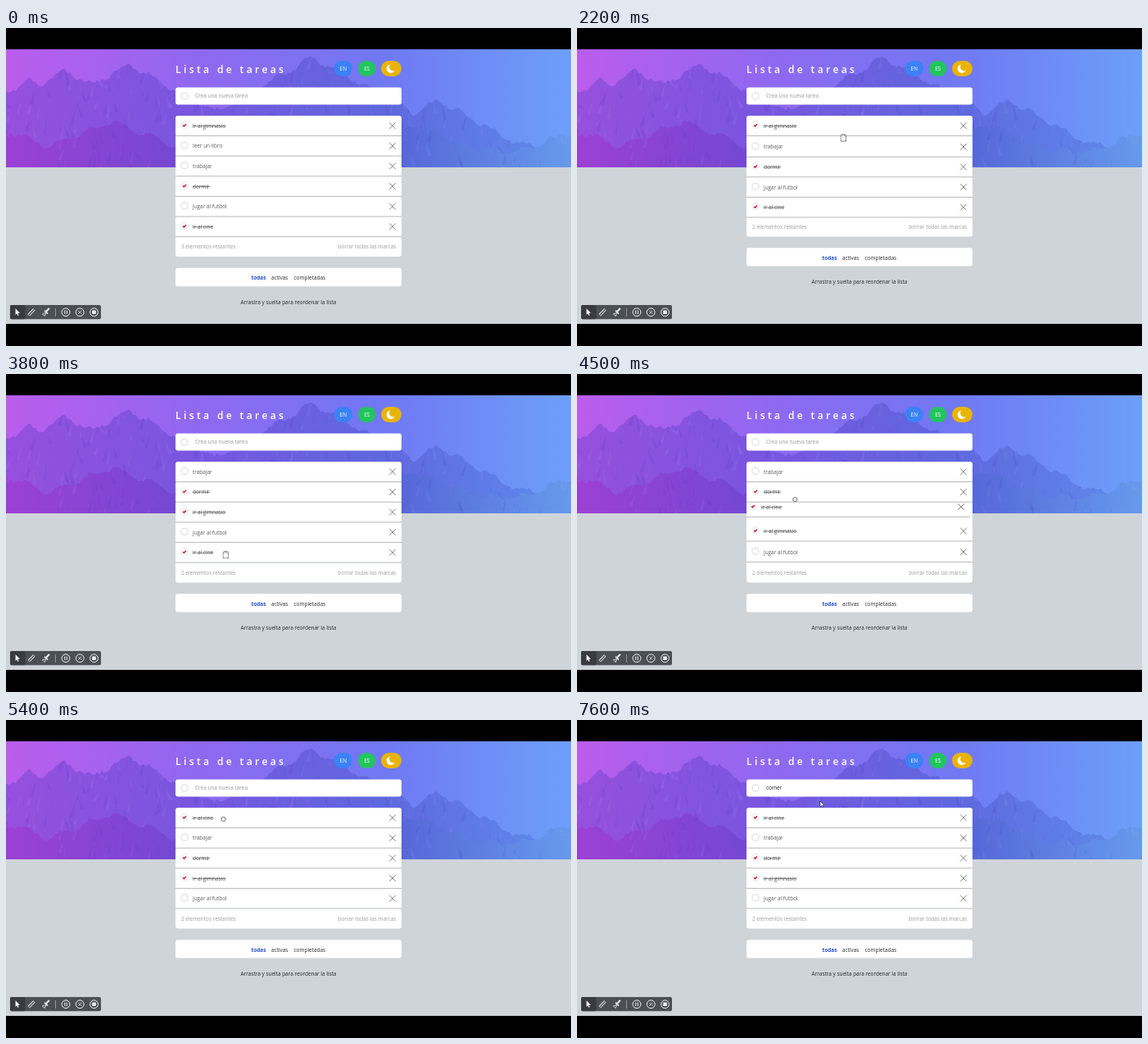
Animation of 690 by 388 pixels, one loop 8 s. Source, as an HTML page with a canvas:

```html
<!DOCTYPE html>
<html lang="es">
<head>
<meta charset="utf-8">
<title>Lista de tareas</title>
<style>
html, body { margin: 0; width: 100%; height: 100%; overflow: hidden; background: #000; }
canvas { display: block; width: 100vw; height: 100vh; }
</style>
</head>
<body>
<canvas id="stage"></canvas>
<script>
const W = 690, H = 388, LOOP = 8000, STEP = 100;
const ROW = 24.6, TOP = 107, LEFT = 207, WIDTH = 276, RIGHT = LEFT + WIDTH;
const FONT = '"Open Sans", "Noto Sans", sans-serif';
const canvas = document.getElementById('stage');
const dpr = window.devicePixelRatio || 1;
canvas.width = W * dpr;
canvas.height = H * dpr;
let c = canvas.getContext('2d');

const easeOut = k => 1 - (1 - Math.min(1, Math.max(0, k))) ** 2;
const slotY = i => TOP + ROW * (i + .5);

// Tasks

const labels = {
  gym: 'ir al gimnasio', read: 'leer un libro', work: 'trabajar',
  sleep: 'dormir', play: 'jugar al futbol', film: 'ir al cine'
};
const done = new Set(['gym', 'sleep', 'film']);

const drags = [
  { id: 'gym', from: 2600, to: 3380, dir: 1, sway: -.5, swaps: [2775, 2990] },
  { id: 'film', from: 4200, to: 5080, dir: -1, sway: -3.4, swaps: [4220, 4290, 4580, 4820] }
];

const first = Object.keys(labels);
const states = [{ at: 0, list: first }, { at: 1960, list: first.filter(id => id !== 'read') }];
for (const d of drags) {
  let list = states[states.length - 1].list;
  let i = list.indexOf(d.id);
  d.start = slotY(i);
  for (const at of d.swaps) {
    list = [...list];
    [list[i], list[i + d.dir]] = [list[i + d.dir], list[i]];
    i += d.dir;
    states.push({ at, list, mover: d.id });
  }
  d.end = slotY(i);
}

function rowPos(id, t) {
  const d = drags.find(d => d.id === id && t >= d.from && t < d.to);
  if (d) {
    const k = (t - d.from) / (d.to - d.from);
    return [d.sway * Math.sin(Math.PI * k), d.start + (d.end - d.start) * easeOut(k)];
  }
  let slot = slotY(first.indexOf(id)), y = slot;
  for (const { at, list, mover } of states) {
    if (at > t) break;
    const next = slotY(list.indexOf(id));
    y += (next - slot) * (mover === id ? 1 : 1 - Math.exp((at - t) / 75));
    slot = next;
  }
  return [0, y];
}

// Pointer glides: begin, end, x, y
const glides = [
  [1900, 1901, 475, 143.5], [2000, 2400, 275, 130], [2600, 3380, 275, 180], [3380, 3800, 268, 220],
  [4100, 5030, 265.5, 121], [5500, 5700, 284, 55], [5700, 5900, 290, 83], [5950, 6100, 297, 103]
];

function pointer(t) {
  let [, , x, y] = glides[0];
  for (const [from, to, gx, gy] of glides) {
    const k = easeOut((t - from) / (to - from));
    x += (gx - x) * k;
    y += (gy - y) * k;
  }
  return [x, y];
}

// Drawing helpers

function text(s, x, y, color, size = 6.45, weight = 400, align = 'left') {
  c.font = `${weight} ${size}px ${FONT}`;
  c.textAlign = align;
  c.fillStyle = color;
  c.fillText(s, x, y + size * .35);
  return c.measureText(s).width;
}

function box(x, y, w, h, r, color) {
  c.fillStyle = color;
  c.beginPath();
  c.roundRect(x, y, w, h, r);
  c.fill();
}

function disc(x, y, r, color) {
  box(x - r, y - r, r * 2, r * 2, r, color);
}

function ring(x, y, r, color, width = .7) {
  c.strokeStyle = color;
  c.lineWidth = width;
  c.beginPath();
  c.arc(x, y, r, 0, 7);
  c.stroke();
}

function trace(points) {
  c.beginPath();
  points.forEach(([x, y]) => c.lineTo(x, y));
}

function line(points, color, width = .8) {
  trace(points);
  c.strokeStyle = color;
  c.lineWidth = width;
  c.stroke();
}

function shape(points, fill) {
  trace(points);
  c.closePath();
  c.fillStyle = fill;
  c.fill();
}

function cross(x, y, r, color) {
  line([[x - r, y - r], [x + r, y + r]], color);
  line([[x + r, y - r], [x - r, y + r]], color);
}

function arrow(x, y, size, edge) {
  c.save();
  c.translate(x, y);
  c.scale(size, size);
  shape([[0, 0], [0, 7], [1.6, 5.6], [2.6, 8], [3.6, 7.5], [2.6, 5.2], [4.8, 5]], '#fff');
  if (edge) {
    c.closePath();
    c.strokeStyle = edge;
    c.lineWidth = .6;
    c.stroke();
  }
  c.restore();
}

function fade(...colors) {
  const g = c.createLinearGradient(0, 0, W, 0);
  colors.forEach((col, i) => g.addColorStop(i / (colors.length - 1), col));
  return g;
}

// Backdrop

function makeBackdrop() {
  const layer = document.createElement('canvas');
  layer.width = canvas.width;
  layer.height = canvas.height;
  const main = c;
  c = layer.getContext('2d');
  c.scale(dpr, dpr);
  let seed = 11;
  const rnd = () => (seed = seed * 16807 % 2147483647) / 2147483647;

  box(0, 0, W, H, 0, '#000');
  box(0, 26, W, 335, 0, '#cfd4d8');
  c.beginPath();
  c.rect(0, 26, W, 144);
  c.clip();
  box(0, 26, W, 144, 0, fade('#bb5cec', '#9068f0', '#7078f3', '#6c9ff9'));

  // Peaks are [x, y]; flanks fall away on both sides
  function ridge(peaks, slope, floor, fill, streaks) {
    const edge = [[0, 172]];
    for (let x = 0; x <= W; x += 3) {
      const flank = Math.min(floor, ...peaks.map(p => p[1] + Math.abs(x - p[0]) * slope));
      edge.push([x, flank + 3 * Math.sin(x / 6) + rnd() * 4]);
    }
    shape([...edge, [W, 172]], fill);
    c.save();
    c.clip();
    for (let i = 0; i < streaks; i++) {
      const x = rnd() * W, y = 30 + rnd() * 140, w = (rnd() - .5) * 16, h = 6 + rnd() * 16;
      const tone = rnd() < .55 ? 'rgba(70,40,180,.12)' : 'rgba(190,180,255,.09)';
      shape([[x, y], [x + w, y + h], [x + w * .4, y + h * 1.1]], tone);
    }
    c.restore();
  }
  ridge([[28, 62], [72, 50], [150, 42], [375, 34], [528, 86]], .55, 140,
    fade('#9650dd', '#7856df', '#5f68de', '#5e8cec'), 420);
  ridge([[0, 122], [130, 112], [320, 104], [500, 116], [690, 124]], .4, 148,
    fade('#9c40d4', '#7049d2', '#5562d6', '#669aec'), 260);
  c = main;
  return layer;
}

// Page

function header() {
  c.letterSpacing = '3.4px';
  text('Lista de tareas', LEFT, 50.9, '#fff', 12, 600);
  c.letterSpacing = '0px';
  box(400.5, 40, 22.5, 19, 9.5, '#3b82f6');
  text('EN', 411.8, 49.8, '#fff', 6.4, 400, 'center');
  box(430, 40, 21.5, 19, 9.5, '#22c55e');
  text('ES', 440.7, 49.8, '#fff', 6.4, 400, 'center');
  box(458, 40, 25, 19, 9.5, '#eab308');
  disc(470, 49.6, 5.3, '#fff');
  disc(472.8, 47.6, 4.8, '#eab308');
}

function radio(x, y, checked) {
  ring(x, y, 4.1, checked ? '#dcdcde' : '#c9cacd');
  if (checked) line([[x - 1.9, y + .1], [x - .6, y + 1.4], [x + 2, y - 1.3]], '#c9142a', 1.5);
}

function inputCard(t) {
  box(LEFT, 72.5, WIDTH, 21, 3, '#fff');
  radio(218, 83, false);
  const value = 'comer'.slice(0, Math.max(0, Math.floor((t - 6600) / 125) + 1));
  const w = value ? text(value, 231, 83.2, '#222') : 0;
  if (!value) text('Crea una nueva tarea', 231, 83.2, '#999');
  const caret = t >= 6000 && t < 6400 || t >= 6600 && t < 7600;
  if (caret) line([[231.3 + w, 78.5], [231.3 + w, 87.5]], '#222', .7);
}

function row(id, t) {
  const checked = done.has(id);
  c.save();
  c.translate(...rowPos(id, t));
  radio(218, -.8, checked);
  const w = text(labels[id], 228, .3, '#5c5c60');
  if (checked) line([[227.8, .4], [228.2 + w, .4]], '#55555a', .7);
  cross(472, 0, 3.8, '#5f5f63');
  line([[LEFT, ROW / 2], [RIGHT, ROW / 2]], '#b5b8bd', 1);
  c.restore();
}

function list(t) {
  const ids = states.filter(s => s.at <= t).pop().list;
  const end = TOP + ROW * ids.length;
  const left = ids.filter(id => !done.has(id)).length;
  box(LEFT, TOP, WIDTH, end - TOP + 24.4, 3, '#fff');
  c.save();
  c.clip();
  ids.forEach(id => row(id, t));
  c.restore();
  text(left + ' elementos restantes', 214, end + 12.6, '#9b9b9f');
  text('borrar todas las marcas', 476.3, end + 12.6, '#9b9b9f', 6.45, 400, 'right');

  const nav = end + 38.2;
  box(LEFT, nav, WIDTH, 22.4, 3, '#fff');
  text('todas', 299.5, nav + 12.2, '#2450d8', 6.4, 700);
  text('activas', 324, nav + 12.2, '#2b2b2f');
  text('completadas', 351.5, nav + 12.2, '#2b2b2f');
  text('Arrastra y suelta para reordenar la lista', 345, nav + 41.6, '#25282d', 6.45, 400, 'center');
}

function toolbar() {
  const ink = '#f2f2f2', dark = '#4b4f56', y = 346.8;
  box(5, 338, 111, 17.3, 2, dark);
  box(5, 338, 18.5, 17.3, 2, '#383b41');
  arrow(11.6, 342.3, 1.1);
  const pencil = [[27.6, 350.4], [34.4, 343.4]];
  line(pencil, ink, 3.4);
  line(pencil, dark, 1.5);
  line([[52.8, 342], [49, 346]], ink, 2);
  line([[47, 344.8], [51, 348.6]], ink, 1.5);
  line([[44.4, 349], [48.6, 347.4], [47.4, 351.6], [44.4, 349]], ink);
  line([[60.5, 342], [60.5, 352]], '#a5a8ad');
  for (const x of [73, 90.2, 107.5]) ring(x, y, 4.9, ink, 1);
  for (const x of [71.8, 74.3]) line([[x, y - 2.3], [x, y + 2.3]], ink, 1);
  cross(90.2, y, 1.9, ink);
  box(105.2, y - 2.3, 4.6, 4.6, .4, ink);
}

function hand(fingers) {
  const parts = [[-2.6, -1, 6, 5.4], ...fingers];
  for (const [grow, color] of [[.6, '#505054'], [0, '#fff']]) {
    for (const [x, y, w, h] of parts) {
      box(x - grow, y - grow, w + grow * 2, h + grow * 2, 1.2, color);
    }
  }
}

function cursor(t) {
  if (t < 1900) return;
  const [x, y] = pointer(t);
  const held = t >= 2600 && t < 3400 || t >= 4100 && t < 5500;
  const overInput = y > 73 && y < 93;
  c.save();
  c.translate(x, y);
  if (held) {
    disc(0, 0, 2.8, '#fff');
    ring(0, 0, 2.6, '#444', .8);
  } else if (t < 2200) {
    hand([[-1.8, -4, 1.5, 6]]);
  } else if (t < 5500) {
    hand([[-2.2, -3, 1.4, 4], [-.4, -3.6, 1.4, 4], [1.5, -3, 1.4, 4]]);
  } else if (overInput) {
    line([[0, -4], [0, 4]], '#222', .7);
  } else {
    arrow(0, -4, 1, '#222');
  }
  c.restore();
}

const backdrop = makeBackdrop();

function draw(now) {
  const t = Math.floor(now % LOOP / STEP) * STEP;
  c.setTransform(dpr, 0, 0, dpr, 0, 0);
  c.drawImage(backdrop, 0, 0, W, H);
  header();
  inputCard(t);
  list(t);
  toolbar();
  cursor(t);
}

const start = performance.now();
function tick() {
  draw(performance.now() - start);
  requestAnimationFrame(tick);
}
tick();
</script>
</body>
</html>
```
